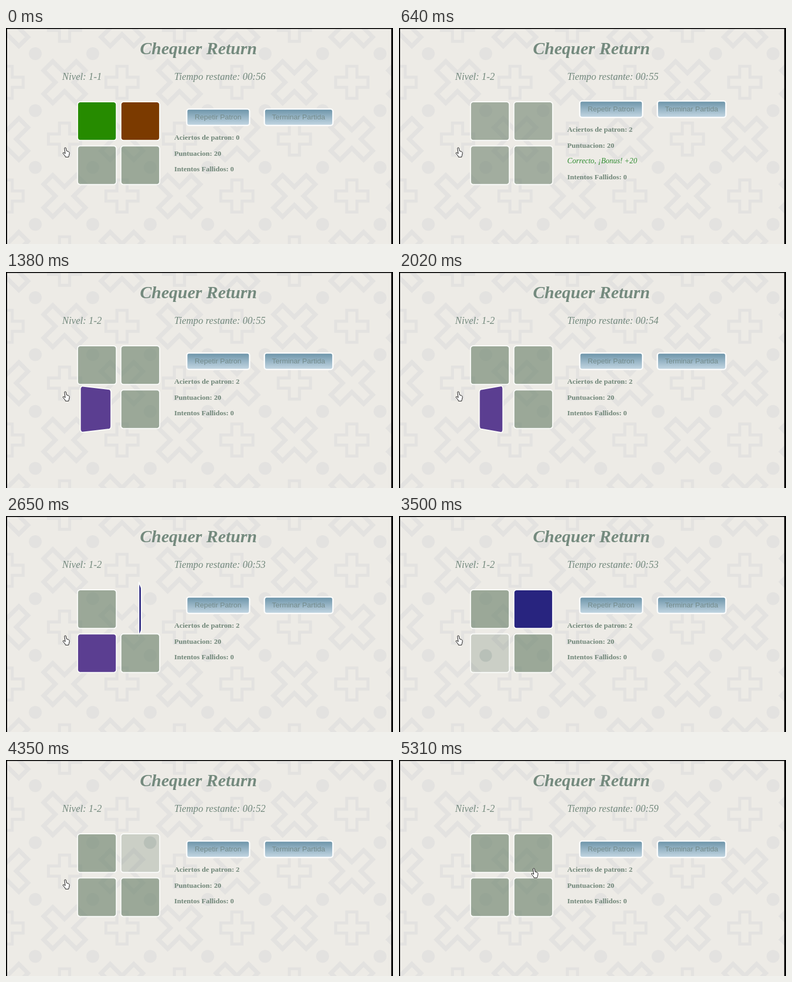
An HTML page that plays this animation: 720 px wide and 404 px high, repeating every 5.42 s.

```html
<!DOCTYPE html>
<html lang="es">
<head>
<meta charset="utf-8">
<title>Chequer Return</title>
<style>
html, body { margin: 0; width: 100%; height: 100%; overflow: hidden; background: #edebe6; }
svg { display: block; width: 100%; height: 100%; }
text { font-family: "Liberation Serif", "Times New Roman", serif; fill: #748a7e; }
.title { font-size: 32.5px; font-weight: bold; font-style: italic; text-anchor: middle; }
.head { font-size: 18.3px; font-style: italic; }
.stat { font-size: 13.5px; font-weight: bold; fill: #708678; }
.bonus { font-size: 14.1px; font-style: italic; fill: #2f8b30; }
.label { font: 13.5px "Liberation Sans", Arial, sans-serif; text-anchor: middle; fill: #748b8b; }
.button { fill: url(#blue); stroke: #fbfcfc; stroke-width: 2.6; }
</style>
</head>
<body>
<svg viewBox="0 0 720 404">
  <defs>
    <linearGradient id="blue" x2="0" y2="1">
      <stop offset="0" stop-color="#6b93a8"/>
      <stop offset="1" stop-color="#c4d7e3"/>
    </linearGradient>
  </defs>
  <rect width="720" height="404" fill="#edebe6"/>
  <g id="paper" fill="none" stroke="#e3e2e0"></g>
  <path d="M0 0H720V404H716.7V1.8H2V404H0Z"/>
  <text class="title" x="358" y="49">Chequer Return</text>
  <text class="head" id="level" x="104.5" y="97"></text>
  <text class="head" id="clock" x="313" y="97"></text>
  <g id="tiles" stroke="#fafbf9" stroke-width="2" stroke-linejoin="round"></g>
  <g id="panel">
    <rect class="button" x="336.2" y="151.5" width="117" height="30.7" rx="4.5"/>
    <text class="label" x="394.5" y="171">Repetir Patron</text>
    <rect class="button" x="480.7" y="151.5" width="127.5" height="30.7" rx="4.5"/>
    <text class="label" x="544.3" y="171">Terminar Partida</text>
    <text class="stat" id="hits" x="313" y="209"></text>
    <text class="stat" x="313" y="239">Puntuacion: 20</text>
    <text class="bonus" id="bonus" x="313" y="268">Correcto, ¡Bonus! +20</text>
    <text class="stat" id="fails" x="313">Intentos Fallidos: 0</text>
  </g>
  <path id="hand" fill="#fff" stroke="#111" stroke-width="1" stroke-linejoin="round"
    d="M3.8 1.6Q5 -.2 6.6 1.4L7.8 7L11.6 8.2Q13.2 9 13 11.5L12.2 15.5L11.4 18.4H5.6L4.8 16L1 11.6Q.6 9.4 2.8 10.2L5.2 12Z"/>
</svg>
<script>
const LOOP = 5420;
// The picture only refreshes at these moments.
const TICKS = [0, 320, 530, 640, 960, 1170, 1380, 1490, 1700, 1800, 2020, 2120, 2340, 2550,
  2650, 2870, 2970, 3180, 3290, 3500, 3720, 3820, 4030, 4140, 4350, 4670, 4990, 5310];
const FLIP = 960, DEPTH = 340, LIFT = 127.5;
const $ = id => document.getElementById(id);
const mix = (a, b, p) => a + (b - a) * p;
const clamp = v => Math.max(0, Math.min(1, v));

function add(parent, tag, attrs) {
  const node = document.createElementNS("http://www.w3.org/2000/svg", tag);
  for (const key in attrs) node.setAttribute(key, attrs[key]);
  return parent.appendChild(node);
}

function cross(x, y, reach, half, width, turn) {
  const d = `M${-half} ${-reach}H${half}V${-half}H${reach}V${half}H${half}V${reach}` +
    `H${-half}V${half}H${-reach}V${-half}H${-half}Z`;
  add($("paper"), "path", { d, "stroke-width": width, transform: `translate(${x} ${y}) rotate(${turn})` });
}

function drawPaper() {
  for (let row = 0; row < 5; row++) {
    for (let col = 0; col < 8; col++) {
      const x = 2 + col * 106.9, y = -5 + row * 106.4;
      if ((row + col) % 2) cross(x, y, 30, 9.5, 5.5, 0);
      else cross(x, y, 43, 12, 8, 45);
      add($("paper"), "circle", { cx: x + 52.5, cy: y + 53, r: 12, fill: "#e3e2e0", stroke: "none" });
    }
  }
}

// Solves a cubic Bezier timing curve whose y handles are 0 and 1.
function ease(x1, x2, x) {
  let lo = 0, hi = 1, s = .5;
  for (let i = 0; i < 24; i++) {
    s = (lo + hi) / 2;
    const at = 3 * (1 - s) ** 2 * s * x1 + 3 * (1 - s) * s * s * x2 + s ** 3;
    if (at < x) lo = s; else hi = s;
  }
  return 3 * s * s - 2 * s ** 3;
}
const easeOut = x => ease(0, .58, x);
const easeIn = x => ease(.42, 1, x);

function flipPose(p) {
  if (p <= 0 || p >= 1) return { angle: 0, lift: 0, scale: 1 };
  if (p < .4) {
    const e = easeOut(p / .4);
    return { angle: mix(-360, -190, e), lift: LIFT * e, scale: 1 };
  }
  if (p < .5) return { angle: mix(-190, -170, easeOut((p - .4) / .1)), lift: LIFT, scale: 1 };
  if (p < .8) {
    const e = easeIn((p - .5) / .3);
    return { angle: mix(-170, 0, e), lift: mix(LIFT, 0, e), scale: mix(1, .95, e) };
  }
  return { angle: 0, lift: 0, scale: mix(.95, 1, easeIn((p - .8) / .2)) };
}

// A rounded square turned about its vertical axis, seen in perspective.
function tilePath(cx, cy, { angle, lift, scale }) {
  const half = 36.1, radius = 5, a = angle * Math.PI / 180, points = [];
  for (let corner = 0; corner < 4; corner++) {
    const sx = corner === 0 || corner === 3 ? 1 : -1, sy = corner < 2 ? 1 : -1;
    for (let i = 0; i <= 5; i++) {
      const turn = (corner + i / 5) * Math.PI / 2;
      const x = scale * (sx * (half - radius) + radius * Math.cos(turn));
      const y = scale * (sy * (half - radius) + radius * Math.sin(turn));
      const k = DEPTH / (DEPTH - lift + x * Math.sin(a));
      points.push((cx + x * Math.cos(a) * k).toFixed(2) + " " + (cy + y * k).toFixed(2));
    }
  }
  return "M" + points.join("L") + "Z";
}

const tiles = [
  { x: 169.2, y: 174.2, color: "#268b00", off: 320 },
  { x: 249.8, y: 174.2, color: "#7b3a00", off: 320,
    turn: { color: "#28247f", on: 2515, off: 4200 }, dot: [268, 154.5] },
  { x: 169.2, y: 256.6, turn: { color: "#5b3e91", on: 1315, off: 3180 }, dot: [161.3, 261] },
  { x: 249.8, y: 256.6 }
];

function drawTile(tile, t) {
  const { turn } = tile;
  let fill = "rgb(115,135,115)", alpha = t >= 320 && t < 960 ? .61 : .665, pose = flipPose(0), faded = 0;
  if (tile.color && t < tile.off) {
    fill = tile.color;
    alpha = 1;
  }
  if (turn && t >= turn.on) {
    if (t < turn.off) {
      fill = turn.color;
      alpha = 1;
      pose = flipPose((t - turn.on) / FLIP);
    } else {
      faded = 1 - clamp((t - turn.off - 320) / 530);
      alpha = mix(.665, .28, faded);
    }
  }
  tile.shape.setAttribute("d", tilePath(tile.x, tile.y, pose));
  tile.shape.setAttribute("fill", fill);
  tile.shape.setAttribute("fill-opacity", alpha);
  if (tile.spot) tile.spot.setAttribute("opacity", .11 * faded);
}

function render(time) {
  const t = TICKS.filter(tick => tick <= time).pop();
  const won = t >= 320, bonus = won && t < 1380;
  const seconds = t >= 5310 ? 59 : 56 - [640, 1700, 2650, 3720].filter(at => t >= at).length;
  $("level").textContent = "Nivel: 1-" + (won ? 2 : 1);
  $("clock").textContent = "Tiempo restante: 00:" + seconds;
  $("hits").textContent = "Aciertos de patron: " + (won ? 2 : 0);
  $("bonus").setAttribute("visibility", bonus ? "visible" : "hidden");
  $("fails").setAttribute("y", bonus ? 298 : 268);
  $("panel").setAttribute("transform", `translate(0 ${bonus ? -15 : 0})`);
  $("hand").setAttribute("transform", t >= 5310 ? "translate(245.5 202)" : "translate(105 223)");
  tiles.forEach(tile => drawTile(tile, t));
}

drawPaper();
for (const tile of tiles) {
  tile.shape = add($("tiles"), "path", {});
  if (tile.dot) {
    tile.spot = add($("tiles"), "circle",
      { cx: tile.dot[0], cy: tile.dot[1], r: 11.5, fill: "#5c8070", stroke: "none" });
  }
}

const start = performance.now();
function frame() {
  render((performance.now() - start) % LOOP);
  requestAnimationFrame(frame);
}
frame();
</script>
</body>
</html>
```
